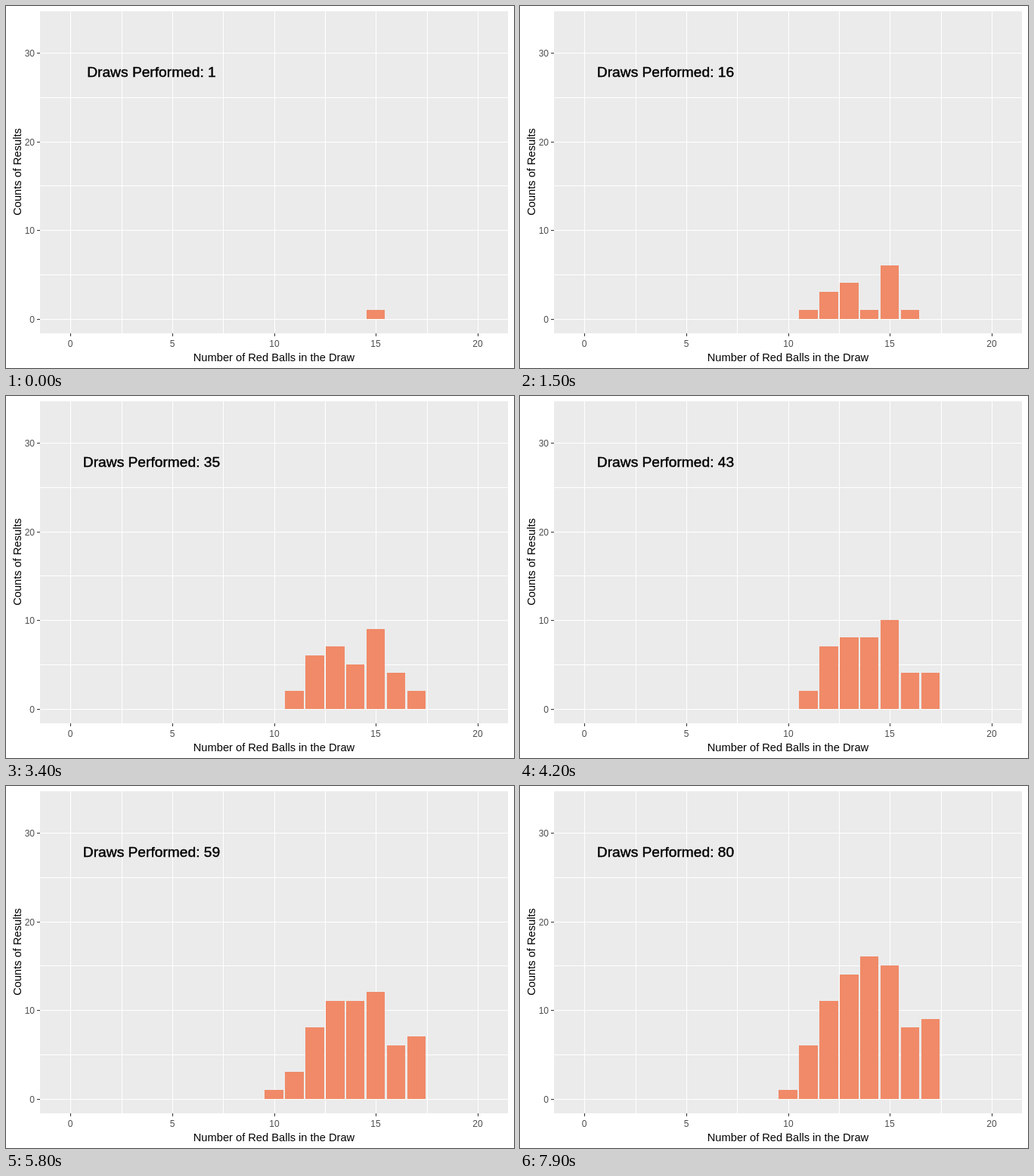
Recreate the animation shown at these times as an HTML page. Size 672x480 px, loop 8000 ms.

```html
<!DOCTYPE html>
<html lang="en">
<head>
<meta charset="utf-8">
<title>Draw counts</title>
<style>
  html, body { margin: 0; width: 100%; height: 100%; overflow: hidden; background: #fff; }
  svg { display: block; width: 672px; height: 480px; font-family: "Liberation Sans", Arial, sans-serif; }
  .tick { font-size: 12px; fill: #4d4d4d; }
  .title { font-size: 14.67px; fill: #000; }
  .counter { font-size: 19.2px; fill: #000; stroke: #000; stroke-width: 0.45px; }
</style>
</head>
<body>
<svg id="chart" viewBox="0 0 672 480" xmlns="http://www.w3.org/2000/svg"></svg>
<script>
const LOOP = 8000, STEP = 100;
const PANEL = { left: 45, top: 7, right: 664, bottom: 434 };

// Red balls counted in each successive draw
const draws = [
  15, 13, 15, 12, 15, 15, 14, 11, 15,
  13, 12, 16, 13, 15, 12, 13, 14, 13,
  16, 11, 12, 13, 16, 14, 15, 12, 14,
  17, 15, 13, 16, 14, 15, 17, 12, 14,
  17, 13, 14, 12, 17, 15, 14, 13, 16,
  17, 12, 13, 14, 17, 15, 14, 16, 13,
  10, 17, 14, 15, 11, 13, 16, 14, 15,
  17, 13, 16, 14, 15, 17, 14, 15, 12,
  11, 12, 14, 13, 11, 14, 12, 11
];

const svg = document.getElementById("chart");
const xAt = v => 85.2 + 26.95 * v;
const yAt = n => 415 - 11.77 * n;

function add(tag, attrs, text) {
  const el = document.createElementNS(svg.namespaceURI, tag);
  for (const key in attrs) el.setAttribute(key, attrs[key]);
  if (text !== undefined) el.textContent = text;
  return svg.appendChild(el);
}

function rect(x, y, width, height, fill) {
  return add("rect", { x, y, width, height, fill, "shape-rendering": "crispEdges" });
}

function label(text, x, y, cls, anchor = "middle") {
  return add("text", { x, y, class: cls, "text-anchor": anchor }, text);
}

const panelWidth = PANEL.right - PANEL.left;
const panelHeight = PANEL.bottom - PANEL.top;
rect(PANEL.left, PANEL.top, panelWidth, panelHeight, "#ebebeb");

for (let v = 0; v <= 20; v += 2.5) {
  const x = Math.round(xAt(v));
  rect(x, PANEL.top, 1, panelHeight, "#fff");
  if (v % 5 === 0) {
    rect(x, PANEL.bottom, 1, 4, "#333");
    label(v, x, 452, "tick");
  }
}

for (let n = 0; n <= 30; n += 5) {
  const y = Math.round(yAt(n));
  rect(PANEL.left, y, panelWidth, 1, "#fff");
  if (n % 10 === 0) {
    rect(PANEL.left - 4, y, 4, 1, "#333");
    label(n, 38, y + 5, "tick", "end");
  }
}

const bars = new Map();
for (let v = 10; v <= 17; v++) {
  bars.set(v, rect(27 * v + 72, 415, v < 14 ? 25 : 24, 0, "#f08a68"));
}

label("Number of Red Balls in the Draw", 354.5, 471, "title");
label("Counts of Results", 0, 0, "title").setAttribute("transform", "translate(19.5 220) rotate(-90)");
const counter = label("", 192.5, 94, "counter");

let shown = 0;
function render(time) {
  const total = Math.floor((time % LOOP) / STEP) + 1;
  if (total === shown) return;
  shown = total;
  const done = draws.slice(0, total);
  for (const [value, bar] of bars) {
    const count = done.filter(d => d === value).length;
    const top = Math.floor(yAt(count));
    bar.setAttribute("y", top);
    bar.setAttribute("height", 415 - top);
  }
  counter.textContent = "Draws Performed: " + total;
}

const start = performance.now();
function tick() {
  render(performance.now() - start);
  requestAnimationFrame(tick);
}
tick();
</script>
</body>
</html>
```
